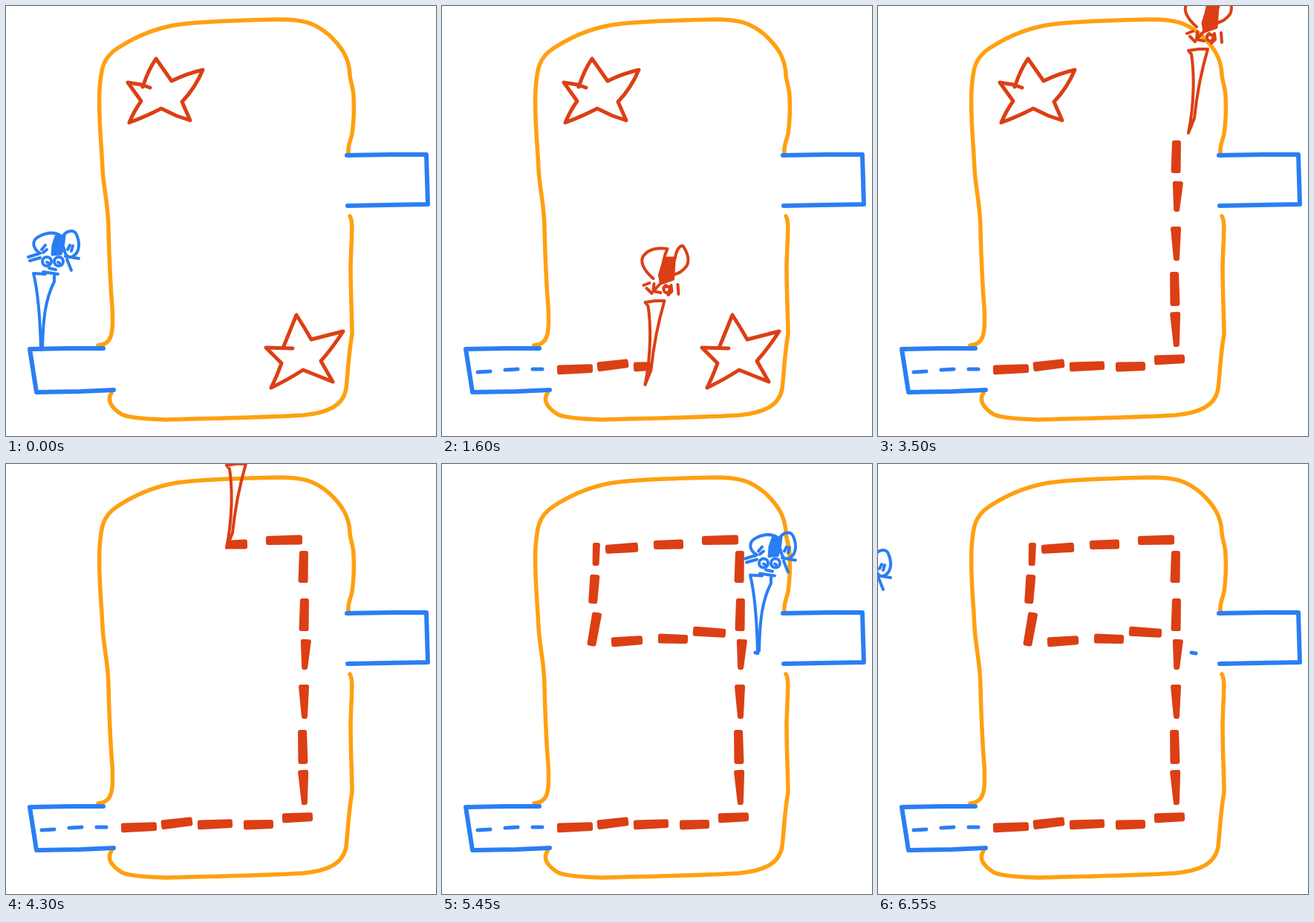
Write an HTML page with a canvas that moves like this. It is 579 px wide and 579 px high and loops after 6650 ms.

```html
<!DOCTYPE html>
<html lang="en">
<head>
<meta charset="utf-8">
<title>Fly trail</title>
<style>
html, body { margin: 0; width: 100%; height: 100%; overflow: hidden; background: #fff; }
canvas { display: block; }
</style>
</head>
<body>
<canvas id="stage" width="579" height="579"></canvas>
<script>
const ctx = document.getElementById('stage').getContext('2d');
const ORANGE = '#ffa00f', BLUE = '#2a7ef4', RED = '#dc3f14';
const LOOP = 6650, DRAW = 100, BLUE_UNTIL = 450, BLUE_FROM = 5390;

const room = new Path2D(`M461 199C460 186 464 182 466 172C468 158 469 140 468 122
  C468 110 463 100 463 92C462 70 452 55 435 39C415 22 400 18 365 18
  C330 19 270 20 240 24C200 28 170 44 150 57C130 70 128 85 126 112
  C124 150 129 190 130 220C132 250 138 270 138 300C139 340 141 380 143 405
  C145 440 143 456 124 457
  M463 283C468 290 465 310 464 350C464 390 466 420 466 442C461 470 460 500 458 515
  C454 540 430 548 400 551C350 554 290 555 215 557C180 556 165 554 156 550
  C140 540 136 530 142 521`);
const doors = new Path2D('M131 461L84 461L32 462L41 520L100 519L145 517M459 201L520 200L566 200L568 267L510 268L460 269');

const stars = [
  { end: 2200, path: new Path2D('M386 461L350 460L371 481Q365 498 357 514Q380 503 400 490L440 506L424 478Q440 460 454 438L411 449Q402 433 391 416L374 458') },
  { end: 4300, path: new Path2D('M194 110L183 106L164 103L182 128Q172 142 166 157Q190 148 209 138L230 148L248 154L237 129Q255 110 265 86Q243 91 223 101L202 71Q192 85 184 109') }
];

// Each fly is placed by the tip of its stick.
const blueFly = {
  tip: [47, 465],
  line: new Path2D(`M46 333C34 325 35 315 45 310C55 305 65 304 73 309M76 312C79 303 92 299 95 308
    C101 322 98 334 88 338C80 339 79 331 78 326M30 338L46 333M32 343L46 339M80 337L98 340
    M82 341L88 356M48 328L53 322M50 332L55 328M83 328L86 322M88 330L90 323
    M61 344A6 6 0 1 1 49 344A6 6 0 1 1 61 344M77 344A6 6 0 1 1 65 344A6 6 0 1 1 77 344
    M55 345L57 346M70 345L72 346M50 358L70 361M58 353L67 355
    M53 361L37 360C43 385 46 420 47 463L49 462C50 420 53 395 65 371L65 363`),
  body: new Path2D('M67 310L79 309L77 326L74 334L62 335L63 322Z')
};
const redFly = {
  tip: [273, 510],
  line: new Path2D(`M284 367C269 354 266 343 271 336C279 326 293 325 303 327C298 337 298 344 297 348
    M313 341C315 329 319 322 324 323C330 332 333 342 329 350C322 359 317 360 311 362
    M271 376L279 373M275 380L282 387M285 374L284 384L294 386M286 382L294 373
    M301 376C295 380 299 388 304 386C308 382 306 376 302 378M308 376L309 384L304 389M317 375L318 388
    M287 397L273 399L277 404C281 430 281 470 273 510L281 490C284 460 290 428 299 397Z`),
  body: new Path2D('M299 339L313 339L311 368L294 374L292 362Z')
};

// start time, from x, y, to x, y, optional half width at the first end
const marks = [
  [40, 48, 493, 65, 492], [170, 85, 490, 102, 489], [300, 122, 489, 135, 489],
  [900, 155, 490, 203, 488], [1370, 209, 486, 251, 481], [1550, 258, 486, 305, 484],
  [1850, 320, 486, 360, 485], [2130, 372, 477, 413, 475], [2330, 402, 459, 400, 412, 4],
  [2550, 400, 404, 399, 358], [2780, 402, 343, 401, 297, 4], [3000, 402, 277, 404, 236, 4],
  [3250, 401, 225, 402, 181], [3610, 400, 160, 401, 117], [3850, 399, 102, 350, 103],
  [4230, 325, 108, 285, 109], [4380, 264, 112, 220, 115], [4500, 208, 106, 207, 137, 5],
  [4610, 206, 149, 203, 188], [4720, 209, 200, 201, 245], [4850, 228, 240, 270, 237],
  [5060, 291, 235, 331, 236], [5220, 338, 225, 382, 228], [5400, 422, 254, 428, 255]
];
const isBlue = t => t < BLUE_UNTIL || t >= BLUE_FROM;

// Free flight between marks: time, tip x, tip y
const flights = [
  [0, 47, 465], [500, 230, 390], [600, 326, 366], [700, 254, 357], [800, 190, 440],
  [2700, 398, 331], [3500, 418, 171], [4200, 333, 120], [5000, 310, 207],
  [5650, 453, 200], [5700, 475, 175], [5800, 502, 180], [5900, 502, 180],
  [6000, 420, 160], [6100, 300, 260], [6200, 170, 387], [6350, 59, 328],
  [6450, 10, 254], [6550, -34, 278], [6650, -60, 300]
];

function buildKeys() {
  const keys = [...flights];
  marks.forEach(([t, x1, y1, x2, y2], i) => {
    const [dx, dy] = isBlue(t) ? [0, 0] : t < 3700 ? [-8, 25] : [0, 4];
    const end = [t + DRAW, x2 + dx, y2 + dy];
    keys.push([t, x1 + dx, y1 + dy], end);
    const next = marks[i + 1];
    if (next && !flights.some(f => f[0] > t && f[0] < next[0]))
      keys.push([(end[0] + next[0]) / 2, (x2 + next[1]) / 2 + dx, (y2 + next[2]) / 2 + dy - 24]);
  });
  return keys.sort((a, b) => a[0] - b[0]);
}
const keys = buildKeys();
const mix = (a, b, u) => a + (b - a) * u;

function tipAt(t) {
  const i = keys.findIndex(k => k[0] > t);
  const a = keys[i - 1], b = keys[i], u = (t - a[0]) / (b[0] - a[0]);
  return [mix(a[1], b[1], u), mix(a[2], b[2], u)];
}

function line(path, color, width) {
  ctx.strokeStyle = color;
  ctx.lineWidth = width;
  ctx.stroke(path);
}

function drawMark([start, x1, y1, x2, y2, w = 6.5], t) {
  const u = Math.min(1, (t - start) / DRAW);
  if (u <= 0) return;
  const x = mix(x1, x2, u), y = mix(y1, y2, u);
  const path = new Path2D();
  if (isBlue(start)) {
    path.moveTo(x1, y1);
    path.lineTo(x, y);
    return line(path, BLUE, 5);
  }
  const len = Math.hypot(x2 - x1, y2 - y1), cx = (x2 - x1) / len, cy = (y2 - y1) / len;
  const inset = Math.min(3, len * u / 2), a = w - 3, b = w < 5 ? 4 : w - 3.5;
  const sx = x1 + cx * inset, sy = y1 + cy * inset, ex = x - cx * inset, ey = y - cy * inset;
  path.moveTo(sx - cy * a, sy + cx * a);
  path.lineTo(ex - cy * b, ey + cx * b);
  path.lineTo(ex + cy * b, ey - cx * b);
  path.lineTo(sx + cy * a, sy - cx * a);
  path.closePath();
  ctx.fillStyle = RED;
  ctx.fill(path);
  line(path, RED, 6);
}

function drawFly(t) {
  const blue = isBlue(t), fly = blue ? blueFly : redFly, color = blue ? BLUE : RED;
  const [x, y] = tipAt(t);
  ctx.save();
  ctx.translate(x - fly.tip[0], y - fly.tip[1]);
  ctx.fillStyle = color;
  ctx.fill(fly.body);
  line(fly.body, color, 3);
  line(fly.line, color, 4);
  ctx.restore();
}

function frame(now) {
  const time = now % LOOP, step = time < 5000 ? 100 : 50;
  const t = Math.floor(time / step) * step;
  ctx.clearRect(0, 0, 579, 579);
  ctx.lineCap = ctx.lineJoin = 'round';
  line(room, ORANGE, 5.5);
  line(doors, BLUE, 6);
  for (const { end, path } of stars) {
    if (t >= end) continue;
    // Only the first arm is left for a moment before the star is gone.
    if (t >= end - 100) ctx.setLineDash([62, 999]);
    line(path, RED, 5);
    ctx.setLineDash([]);
  }
  marks.forEach(m => drawMark(m, t));
  drawFly(t);
  requestAnimationFrame(() => frame(performance.now() - began));
}
const began = performance.now();
frame(0);
</script>
</body>
</html>
```
